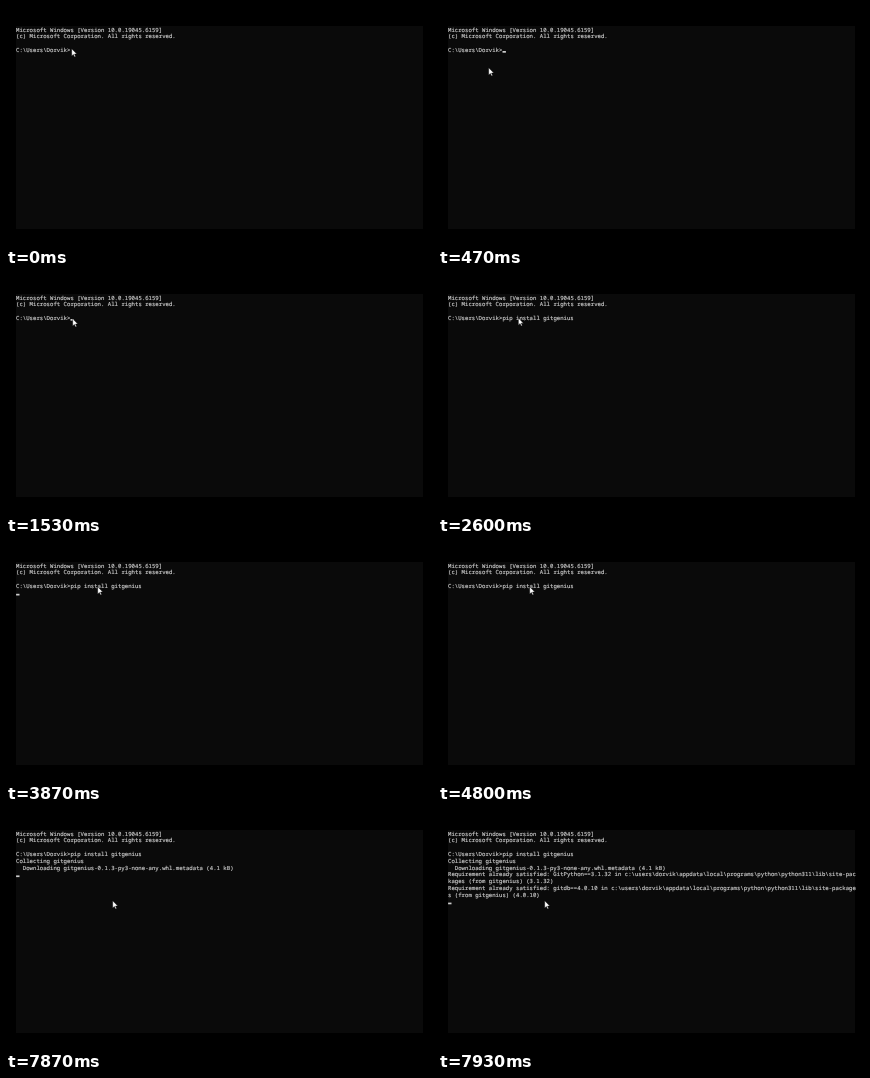
An HTML page with a canvas for the animation above (8000 ms loop, 426 by 240 pixels).

```html
<!DOCTYPE html>
<html lang="en">
<head>
<meta charset="utf-8">
<title>Terminal</title>
<style>
  html, body { margin: 0; width: 100%; height: 100%; overflow: hidden; background: #000; }
  #stage { position: relative; width: 426px; height: 240px; overflow: hidden; }
  #window { position: absolute; left: 10px; top: 20px; width: 407px; height: 203px; background: #0a0a0a; }
  /* Laid out ten times larger, with a trace of rotation, so baselines are not snapped to whole pixels. */
  #screen {
    position: absolute; left: 10.1px; top: 19.6px; margin: 0; width: 4200px;
    font: 56.667px/68px "Noto Sans Mono", "DejaVu Sans Mono", monospace;
    font-variant-ligatures: none; text-rendering: geometricPrecision;
    color: #ccc; -webkit-text-stroke: 1.5px #ccc;
    transform: scale(.1) rotate(.01deg); transform-origin: 0 0;
  }
  canvas { position: absolute; left: 0; top: 0; }
</style>
</head>
<body>
<div id="stage">
  <div id="window"></div>
  <pre id="screen"></pre>
  <canvas id="overlay" width="426" height="240"></canvas>
</div>
<script>
const LOOP = 8000, STEP = 1000 / 15, BLINK = 15.85;
const LEFT = 10.1, TOP = 19.6, COL = 3.4, ROW = 6.8, COLS = 120;

const screen = document.getElementById('screen');
const ctx = document.getElementById('overlay').getContext('2d');

const site = 'c:\\users\\dorvik\\appdata\\local\\programs\\python\\python311\\lib\\site-packages';
const need = (pkg, version) =>
  `Requirement already satisfied: ${pkg}==${version} in ${site} (from gitgenius) (${version})\n`;

// Output chunks: [step at which it appears, text]
const output = [
  [0, 'Microsoft Windows [Version 10.0.19045.6159]\n' +
      '(c) Microsoft Corporation. All rights reserved.\n\nC:\\Users\\Dorvik>'],
  [27, 'pip install gitgenius'],
  [51, '\n'],
  [98, 'Collecting gitgenius\n'],
  [118, '  Downloading gitgenius-0.1.3-py3-none-any.whl.metadata (4.1 kB)\n'],
  [119, need('GitPython', '3.1.32') + need('gitdb', '4.0.10')]
];

// Input and output restart the blinking: [from step, first blink]
const blinks = [[0, 2], [26, 25.35], [98, 113]];

// Pointer stops: [step, x, y]
const path = [
  [0, 66, 43], [7, 51, 62], [9, 64, 79], [11, 93, 73], [13, 81, 69], [23, 67, 45],
  [29, 66.5, 43], [38, 66.5, 43], [41, 92, 45], [72, 92, 45], [75, 107, 91], [120, 107, 91]
];

const arrow = [[0, 0], [0, 17], [4, 13.3], [6.6, 19.2], [9.2, 18], [6.7, 12.3], [12, 12.3]];

const easeOut = k => 1 - (1 - k) ** 2;

function textAt(step) {
  const text = output.filter(([at]) => step >= at).map(([, s]) => s).join('');
  return text.split('\n').flatMap(line => line.match(new RegExp(`.{1,${COLS}}`, 'g')) || ['']);
}

function caretAt(step) {
  const first = blinks.filter(([from]) => step >= from).pop()[1];
  return step >= first && (step - first) % BLINK < BLINK / 2;
}

function pointerAt(step) {
  const i = path.findIndex(p => p[0] > step);
  const [s0, x0, y0] = path[i - 1], [s1, x1, y1] = path[i];
  const k = easeOut((step - s0) / (s1 - s0));
  return [x0 + (x1 - x0) * k, y0 + (y1 - y0) * k];
}

function drawCaret(lines) {
  const row = lines.length - 1;
  ctx.fillStyle = '#ccc';
  ctx.fillRect(LEFT + lines[row].length * COL, TOP + row * ROW + 5, COL, 1.7);
}

function drawPointer(x, y) {
  ctx.save();
  ctx.translate(x - .3, y - .2);
  ctx.scale(.425, .425);
  ctx.beginPath();
  arrow.forEach(p => ctx.lineTo(...p));
  ctx.closePath();
  ctx.fillStyle = '#fff';
  ctx.strokeStyle = '#000';
  ctx.lineWidth = 1;
  ctx.fill();
  ctx.stroke();
  ctx.restore();
}

let shown = -1;
function render(step) {
  if (step === shown) return;
  shown = step;
  const lines = textAt(step), text = lines.join('\n');
  if (screen.textContent !== text) screen.textContent = text;
  ctx.clearRect(0, 0, 426, 240);
  if (caretAt(step)) drawCaret(lines);
  drawPointer(...pointerAt(step));
}

const start = performance.now();
function tick() {
  const t = (performance.now() - start) % LOOP;
  render(Math.min(119, Math.floor(t / STEP + .1)));
  requestAnimationFrame(tick);
}
render(0);
requestAnimationFrame(tick);
</script>
</body>
</html>
```
